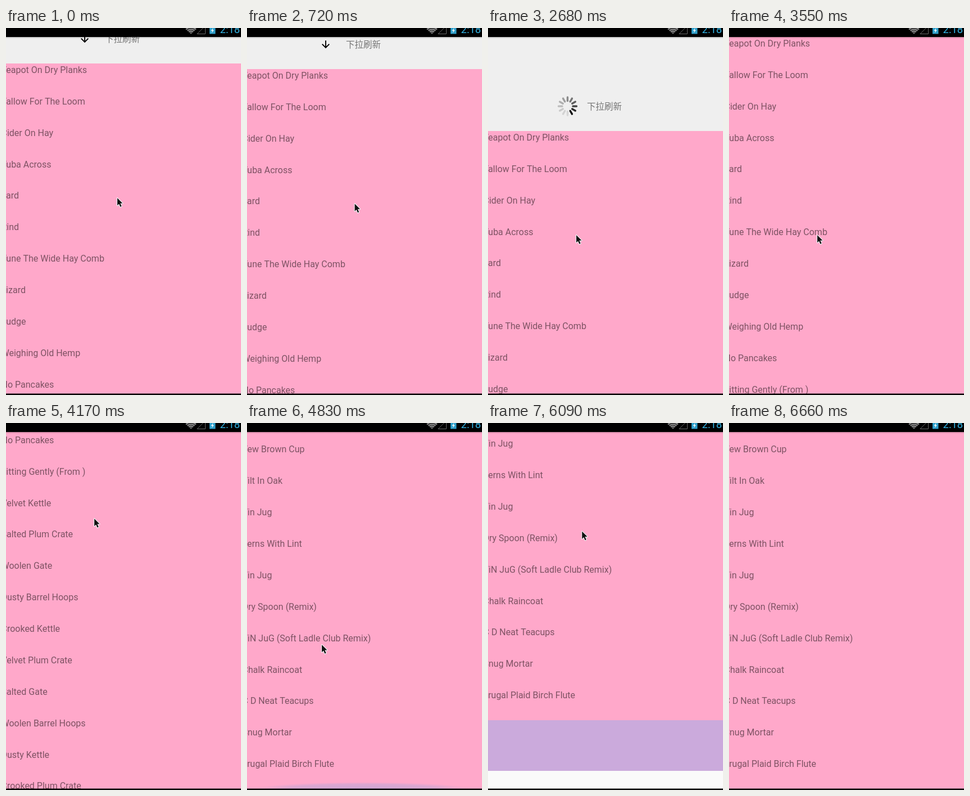
An HTML page with a canvas that plays this animation: 418x652 px, repeating every 7420 ms.

```html
<!DOCTYPE html>
<html lang="zh">
<head>
<meta charset="utf-8">
<title>Pull to refresh</title>
<style>
html, body { margin: 0; width: 100%; height: 100%; overflow: hidden; background: #000; }
canvas { display: block; }
</style>
</head>
<body>
<canvas id="stage" width="418" height="652"></canvas>
<script>
const ctx = document.getElementById('stage').getContext('2d');
const W = 418, H = 652, TOP = 16, BOTTOM = 650;
const LOOP = 7420, ROW = 55.87;
const FOOTER = 90, REFRESH_HEIGHT = 167, PULL_MAX = 109;
const RELEASE = 2140, SETTLE = 220;

const opening = [
  'Teapot On Dry Planks', 'Tallow For The Loom', 'Cider On Hay', 'Tuba Across',
  'Lard', 'Rind', 'Tune The Wide Hay Comb', 'Lizard', 'Fudge',
  'Weighing Old Hemp', 'No Pancakes', 'Fitting Gently (From )'
];
const closing = [
  'Yew Brown Cup', 'Tilt In Oak', 'Tin Jug', 'Ferns With Lint', 'Tin Jug',
  'Dry Spoon (Remix)', 'TiN JuG (Soft Ladle Club Remix)', 'Chalk Raincoat',
  'C D Neat Teacups', 'Snug Mortar', 'Frugal Plaid Birch Flute'
];
const adjectives = ['Velvet', 'Woolen', 'Crooked', 'Salted', 'Dusty'];
const nouns = ['Kettle', 'Barrel Hoops', 'Gate', 'Plum Crate'];
const middle = Array.from({ length: 14 }, (_, i) =>
  adjectives[i * 3 % 5] + ' ' + nouns[i * 3 % 4]);
const rows = [...opening, ...middle, ...closing];
const SCROLL_END = rows.length * ROW - (BOTTOM - TOP);

const linear = p => p;
const easeOut = p => 1 - (1 - p) ** 2;
const easeInOut = p => p * p * (3 - 2 * p);
const fling = p => p ** 1.5;

// Eased progress from 0 to 1 between two times.
function ramp(t, from, to, ease = linear) {
  return ease(Math.min(1, Math.max(0, (t - from) / (to - from))));
}

function stateAt(t) {
  const drag = 5 * ramp(t, 60, 420) + 57 * ramp(t, 570, 1430, easeInOut);
  const pull = PULL_MAX - 62 + drag
    + (REFRESH_HEIGHT - PULL_MAX) * ramp(t, RELEASE, RELEASE + SETTLE, easeOut)
    - REFRESH_HEIGHT * ramp(t, 3550 - SETTLE, 3550, easeOut);

  const lift = 152 * ramp(t, 4900, 5380, easeInOut) + 31 * ramp(t, 5470, 5640);
  const push = lift
    - (183 - FOOTER) * ramp(t, 6000, 6000 + SETTLE, easeOut)
    - FOOTER * ramp(t, 6660 - SETTLE, 6660, easeOut);

  const back = ramp(t, 4300, 4770, easeInOut);
  const swipe = ramp(t, 3820, 4020, easeOut) - back;
  const leave = ramp(t, 6060, 6500, easeInOut);
  return {
    pull: Math.round(pull),
    push: Math.round(push),
    scroll: SCROLL_END * ramp(t, 3820, 4480, fling),
    glow: ramp(t, 4440, 4530) - ramp(t, 4780, 5000),
    cursorX: 198 - 0.66 * drag - 24 * back + 0.165 * lift + 280 * leave,
    cursorY: 302 + 1.065 * drag - 198 * swipe + 26 * back - 1.105 * lift + 55 * leave
  };
}

function rect(x, y, w, h, color) {
  ctx.fillStyle = color;
  ctx.fillRect(x, y, w, h);
}

function path(points, close) {
  ctx.beginPath();
  points.forEach(([x, y]) => ctx.lineTo(x, y));
  if (close) ctx.closePath();
}

function fillShape(points, color) {
  path(points, true);
  ctx.fillStyle = color;
  ctx.fill();
}

function strokeLine(points, color, width) {
  path(points);
  ctx.strokeStyle = color;
  ctx.lineWidth = width;
  ctx.stroke();
}

function text(string, x, y, font, color) {
  ctx.font = font;
  ctx.fillStyle = color;
  ctx.fillText(string, x, y);
}

function drawArrow(x, y, up) {
  ctx.save();
  ctx.translate(x, y);
  if (!up) ctx.scale(1, -1);
  strokeLine([[0, 6.8], [0, -6]], '#000', 1.9);
  strokeLine([[-6.3, 0.3], [0, -6], [6.3, 0.3]], '#000', 1.9);
  ctx.restore();
}

function drawSpinner(x, y, t) {
  const lead = Math.floor((t - RELEASE) / 90) - 1;
  ctx.save();
  ctx.translate(x, y);
  ctx.lineCap = 'round';
  for (let i = 0; i < 12; i++) {
    const a = (lead - i) * Math.PI / 6;
    const s = Math.sin(a), c = -Math.cos(a);
    const alpha = 0.1 + 0.85 * (1 - i / 11) ** 1.6;
    strokeLine([[s * 9.5, c * 9.5], [s * 16, c * 16]], `rgba(0,0,0,${alpha})`, 3.4);
  }
  ctx.restore();
}

function drawHeader(t, pull) {
  rect(0, TOP, W, pull, '#efefef');
  const y = TOP + pull - 44;
  if (t >= RELEASE) drawSpinner(141.5, y, t);
  else drawArrow(140, y, pull >= FOOTER);
  text('下拉刷新', 176, y + 6, '15.5px "Noto Sans CJK SC", "Noto Sans CJK", sans-serif', '#757575');
}

function drawList(top, bottom, scroll) {
  ctx.save();
  ctx.beginPath();
  ctx.rect(0, top, W, bottom - top);
  ctx.clip();
  rect(0, top, W, bottom - top, '#ffa8ca');
  rows.forEach((title, i) => {
    const y = Math.round(top + i * ROW - scroll + 17);
    if (y > 0 && y < H + 20) text(title, -8.5, y, '16px Roboto, sans-serif', 'rgba(0,0,0,.51)');
  });
  ctx.restore();
}

function drawGlow(strength) {
  if (strength <= 0) return;
  ctx.save();
  ctx.translate(W / 2 - 3, BOTTOM);
  ctx.scale(190, 12);
  const g = ctx.createRadialGradient(0, 0, 0, 0, 0, 1);
  g.addColorStop(0, `rgba(140,165,225,${0.55 * strength})`);
  g.addColorStop(0.7, `rgba(140,165,225,${0.4 * strength})`);
  g.addColorStop(1, 'rgba(140,165,225,0)');
  rect(-1, -1, 2, 1, g);
  ctx.restore();
}

function drawWifi(x, y) {
  ctx.strokeStyle = '#858585';
  ctx.lineWidth = 2.6;
  for (let r = 1.5; r < 13; r += 3.4) {
    ctx.beginPath();
    ctx.arc(x, y, r, -Math.PI * 0.77, -Math.PI * 0.23);
    ctx.stroke();
  }
}

function drawStatusBar() {
  rect(0, 0, W, TOP, '#000');
  const shade = ctx.createLinearGradient(0, TOP, 0, TOP + 3);
  shade.addColorStop(0, 'rgba(0,0,0,.2)');
  shade.addColorStop(1, 'rgba(0,0,0,0)');
  rect(0, TOP, W, 3, shade);

  drawWifi(329, 10.5);
  strokeLine([[354.5, -4], [340, 10.5], [354.5, 10.5], [354.5, -4]], '#6a6a6a', 1);
  rect(362, 0, 10.5, 10.5, '#2f9fca');
  fillShape([[368.5, 0], [364.5, 5], [367, 5], [365.5, 9], [370, 3.8], [367.5, 3.8]], '#fff');
  text('2:18', 380.5, 9, '18.5px Roboto, sans-serif', '#33b5e5');
}

function drawCursor(x, y) {
  const outline = [[0, 0], [0, 14], [3.2, 11], [5.6, 16.6], [8, 15.6], [5.6, 10], [10, 10]];
  ctx.save();
  ctx.translate(x, y);
  ctx.scale(0.95, 0.95);
  path(outline, true);
  ctx.lineJoin = 'round';
  ctx.strokeStyle = '#fff';
  ctx.lineWidth = 2;
  ctx.stroke();
  fillShape(outline, '#111');
  ctx.restore();
}

function draw(t) {
  const s = stateAt(t);
  const listBottom = BOTTOM - s.push;
  rect(0, 0, W, H, '#fafafa');
  if (s.pull > 0) drawHeader(t, s.pull);
  drawList(TOP + s.pull, listBottom, s.scroll + s.push);
  rect(0, listBottom, W, FOOTER, '#cbaadc');
  drawGlow(s.glow);
  drawStatusBar();
  rect(0, BOTTOM - 0.5, W, 3, '#000');
  drawCursor(s.cursorX, s.cursorY);
}

const start = performance.now();
function tick() {
  draw((performance.now() - start) % LOOP);
  requestAnimationFrame(tick);
}
tick();
</script>
</body>
</html>
```
